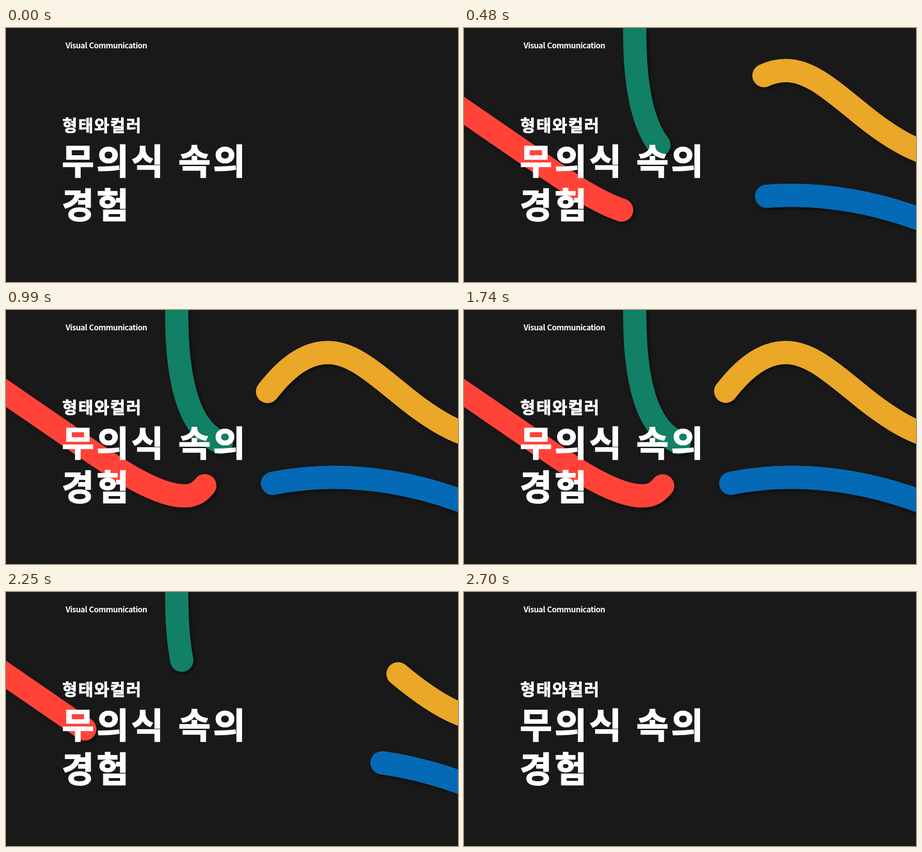
These frames come from a looping animation (998x561 px, 2850 ms). An HTML page with a canvas:

```html
<!DOCTYPE html>
<html lang="ko">
<head>
<meta charset="utf-8">
<title>Visual Communication</title>
<style>
  html, body { margin: 0; width: 100%; height: 100%; overflow: hidden; background: #191919; }
  canvas, svg { position: absolute; left: 0; top: 0; width: 998px; height: 561px; }
  text { fill: #fff; stroke: #fff; font-family: "Noto Sans CJK KR", "Noto Sans CJK", "Noto Sans", sans-serif; font-weight: 700; }
  .label { font-size: 17.2px; letter-spacing: -.55px; stroke: none; }
  .sub { font-size: 36px; letter-spacing: 2.1px; stroke-width: 1px; }
  .title { font-size: 77px; letter-spacing: 5.8px; stroke-width: 2.2px; }
</style>
</head>
<body>
<canvas width="998" height="561"></canvas>
<svg viewBox="0 0 998 561">
  <text class="label" x="131.5" y="44.5">Visual Communication</text>
  <text class="sub" x="124.3" y="229">형태와컬러</text>
  <text class="title" x="123.6" y="323">무의식 속의</text>
  <text class="title" x="123.6" y="420">경험</text>
</svg>
<script>
const W = 998, H = 561, LOOP = 2850, STEP = 30;
const ctx = document.querySelector('canvas').getContext('2d');

// Each path runs from its resting tip outwards; travel is how far the tip moves.
const ribbon = (color, travel, d) => ({ color, travel, path: new Path2D(d) });
const ribbons = [
  ribbon('#118064', 374, 'M475.5 293 C398 262 376 140 377 0 V-60'),
  ribbon('#ff4339', 645, 'M439 388 C430 399 418 411 393 410.5 C335 410.5 250 355 174.5 303 L0 183 L-60 142'),
  ribbon('#eaa728', 741, 'M577.5 180 C615 132 658 94 711 94 C764 94 812 138 866 181 C903 212 949 247 998 268 L1060 294'),
  ribbon('#046ab5', 522, 'M588.5 383 C633 374 678 369.5 722 369.5 C812 369.5 905 386 998 419 L1060 441')
];

const clamp = v => Math.min(1, Math.max(0, v));
const easeIn = t => (1 - t) ** 4.5 * (1 + 4.22 * t);
const easeOut = t => t * t * (1 + 1.29 * (1 - t));

// Share of the travel that is still hidden.
const hidden = ms => ms < 1000 ? easeIn(clamp(ms / 990)) : easeOut(clamp((ms - 1720) / 980));

function drawRibbon({ color, travel, path }, share) {
  const dash = 2000;
  ctx.setLineDash([dash, dash]);
  ctx.lineDashOffset = 2 * dash - share * travel;
  ctx.strokeStyle = color;
  ctx.stroke(path);
}

function draw(ms) {
  ctx.shadowColor = 'transparent';
  ctx.fillStyle = '#191919';
  ctx.fillRect(0, 0, W, H);
  ctx.lineWidth = 51.4;
  ctx.lineCap = 'round';
  ctx.shadowColor = 'rgba(0,0,0,.5)';
  ctx.shadowBlur = 7;
  ctx.shadowOffsetX = ctx.shadowOffsetY = 4;
  const share = hidden(ms);
  if (share < 1) ribbons.forEach(r => drawRibbon(r, share));
  ctx.shadowColor = 'transparent';
  ctx.fillStyle = '#101010';
  ctx.fillRect(0, H - 1, W, 1);
}

const start = performance.now();
function tick() {
  const ms = (performance.now() - start) % LOOP;
  draw(ms - ms % STEP);
  requestAnimationFrame(tick);
}
tick();
</script>
</body>
</html>
```
